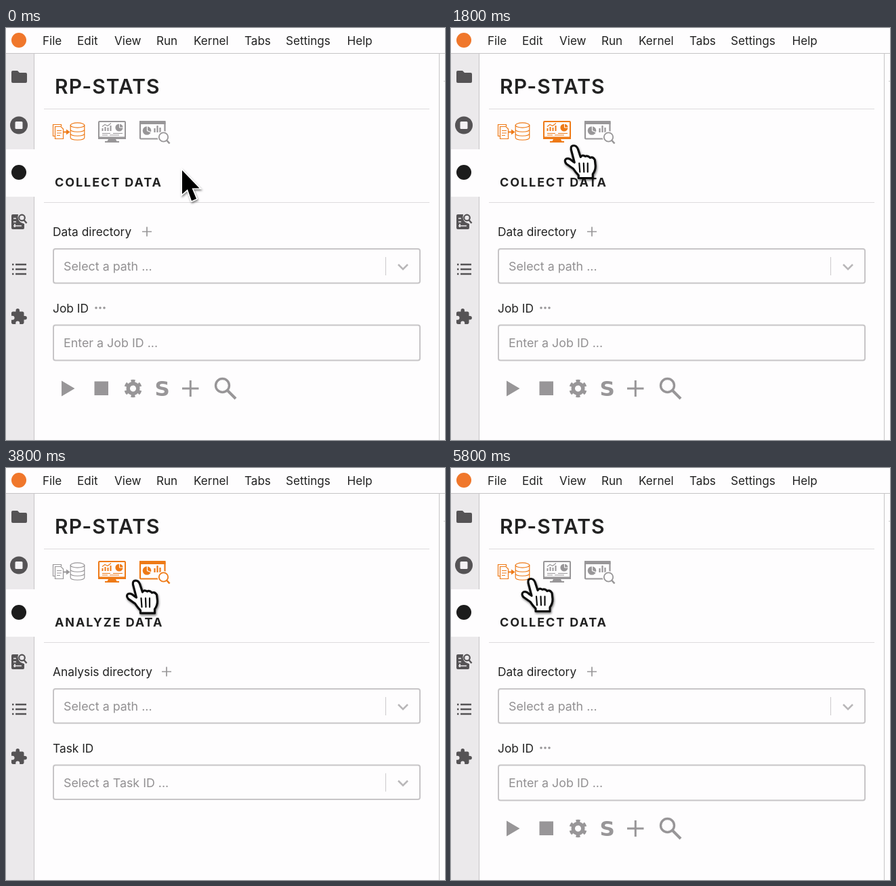
Recreate the animation shown at these times as an HTML page. Size 648 by 608 pixels, loop 5.9 s.

```html
<!DOCTYPE html>
<html lang="en">
<head>
<meta charset="utf-8">
<title>Tabs demo</title>
<style>
  html, body { margin: 0; height: 100%; overflow: hidden; background: #fefdfe; }
  svg { display: block; width: 100vw; height: 100vh; font: 17.1px Inter, "Open Sans", sans-serif; fill: #222; }
  .line { fill: none; stroke: currentColor; }
  .solid { fill: currentColor; }
  .gray { color: #989698; }
  .dark { color: #555355; }
  .label { font-size: 17.35px; }
  .hint { font-size: 17.85px; fill: #929092; }
  .box { fill: #fefdfe; stroke: #c7c5c7; stroke-width: 2; }
  .rule { stroke: #dddbdd; }
  .edge { stroke: #c6c4c6; }
  .head { font-size: 18px; font-weight: 700; letter-spacing: 1.9px; }
  .note { font: 31.3px Lato, Carlito, sans-serif; fill: #444; }
  .icon { color: #989698; }
  .icon.hot { color: #ee7a17; }
</style>
</head>
<body>
<svg viewBox="0 0 648 608">
  <defs>
    <filter id="shadow" x="-40%" y="-40%" width="180%" height="180%">
      <feDropShadow dx="1" dy="2" stdDeviation="1.8" flood-opacity=".5"/>
    </filter>
    <g id="dots" class="solid"><circle cx="-6" r="1.8"/><circle r="1.8"/><circle cx="6" r="1.8"/></g>
    <path id="plus" class="line" d="M-7 0H7M0-7V7" stroke-width="1.7"/>
    <g id="select">
      <rect class="box" x="70" y="0" width="541" height="50.5" rx="3"/>
      <path d="M560.5 12V39" stroke="#cccacc"/>
      <path d="M579 23l7 7 7-7" fill="none" stroke="#b9b7b9" stroke-width="2.5"/>
    </g>
  </defs>

  <!-- menu bar -->
  <circle cx="19" cy="18" r="11" fill="#f0772b"/>
  <g id="menu"></g>

  <!-- side bar -->
  <path d="M0 38H41V608H0z" fill="#ebe9eb"/>
  <path d="M0 179H42V249H0z" fill="#fefdfe"/>
  <path class="edge" d="M0 37.5H648M41.5 38V179M41.5 249V608M639.5 38V608" fill="none"/>
  <path d="M646 78h2v1h-2z" fill="#ccc"/>
  <g class="dark">
    <path class="solid" d="M10 63h7l3 3h9q2 0 2 2v11q0 2-2 2H10q-2 0-2-2V65q0-2 2-2z"/>
    <circle class="solid" cx="19" cy="143.5" r="13"/>
    <rect x="13.5" y="138" width="11" height="11" rx="1.5" fill="#f4f2f4"/>
    <circle cx="19" cy="213" r="11" fill="#1c1c1c"/>
    <path class="solid" d="M10 275h8q-2 8 4 12l5 2v6q0 2-2 2H10q-2 0-2-2V277q0-2 2-2z"/>
    <path d="M11 281h4M11 286h4M11 292h12M13 289v5" stroke="#ebe9eb" stroke-width="1.7"/>
    <circle class="line" cx="23.5" cy="280" r="4.3" stroke-width="2.2"/>
    <path class="line" d="M26.5 283.5l4 4.5" stroke-width="2.4"/>
    <path class="line" d="M14 349H30M14 356H30M14 363H30M9 349h2.5M9 356h2.5M9 363h2.5" stroke-width="2.3"/>
    <path class="solid" transform="translate(5.8 413) scale(1.09)" d="M20.5 11H19V7c0-1.1-.9-2-2-2h-4V3.500a2.500 2.500 0 0 0-5 0V5H4c-1.100 0-2 .9-2 2v3.800h1.500a2.700 2.700 0 0 1 0 5.400H2V20c0 1.100.9 2 2 2h3.800v-1.500a2.700 2.700 0 0 1 5.400 0V22H17c1.100 0 2-.9 2-2v-4h1.500a2.500 2.500 0 0 0 0-5z"/>
  </g>

  <!-- panel -->
  <text x="72" y="96.500" font-size="30" font-weight="600" letter-spacing="1.1">RP-STATS</text>
  <path class="rule" d="M56 119.5H625M56 257.5H625"/>

  <g class="icon">
    <g class="line" stroke-width="1.2">
      <path d="M72 159.5H69.500V142.500H81.500V145M72.500 145.500H81l3.500 3.500V163.500H72.500zM75 151.500h7M75 155h7M75 158.500h5"/>
      <path d="M85 153.500h5" stroke-width="2"/>
      <ellipse cx="105.500" cy="143.500" rx="10.300" ry="3.600"/>
      <path d="M95.200 143.500V161.500c0 5 20.600 5 20.600 0V143.500M95.200 149.500c0 5 20.600 5 20.600 0M95.200 155.500c0 5 20.600 5 20.600 0"/>
    </g>
    <path class="solid" d="M89 149.500l5.500 4-5.500 4z"/>
  </g>
  <g class="icon">
    <rect class="line" x="137" y="138" width="39" height="25" rx="1" stroke-width="2"/>
    <path class="solid" d="M136 160.500H177V164H136zM151 164H162L163.500 167H167V169H146V167H149.500z"/>
    <path class="line" d="M142.500 152v-4M146.500 152v-6M150.500 152v-5M154.500 152v-8" stroke-width="2"/>
    <path class="line" d="M142 145.500l4-3 4 2 5-4M142 155.500h12M158 155.500h14M142 158h8M153 158h14" stroke-width="1.100"/>
    <circle class="solid" cx="167" cy="147" r="5.600"/>
    <path d="M167.500 141V147H173" fill="none" stroke="#fefdfe"/>
  </g>
  <g class="icon">
    <rect class="line" x="198" y="138" width="36.500" height="25.500" rx="1" stroke-width="2.200"/>
    <path class="solid" d="M197 137H235.500V142H197z"/>
    <circle class="solid" cx="208" cy="151.500" r="6.300"/>
    <path d="M208.500 145V151.500L214 154" fill="none" stroke="#fefdfe" stroke-width="1.200"/>
    <path class="line" d="M219.500 154v-6M223.500 154v-10M227.500 154v-7" stroke-width="2.200"/>
    <circle cx="232.500" cy="161" r="9" fill="#fefdfe"/>
    <circle class="line" cx="232.500" cy="161" r="6.700" stroke-width="1.800"/>
    <path class="line" d="M237.500 166l4 4.500" stroke-width="2.600"/>
  </g>

  <text id="heading" class="head" x="72" y="233.500"></text>
  <text id="dirLabel" class="label" x="69" y="307"></text>
  <use id="add" class="gray" href="#plus" y="300.500"/>
  <use href="#select" y="326"/>
  <text class="hint" x="85" y="358">Select a path ...</text>
  <text id="idLabel" class="label" x="69" y="420"></text>
  <rect id="entry" class="box" x="70" y="438.500" width="541" height="52" rx="3"/>
  <use id="choice" href="#select" y="438.500"/>
  <text id="idHint" class="hint" x="85" y="471"></text>

  <g id="collect" class="gray">
    <use href="#dots" x="139" y="413"/>
    <path class="solid" d="M82 520.500V543.500L101.500 532zM130.500 521.500H151V542H130.500z"/>
    <g class="line" transform="translate(187.500 532) rotate(15)">
      <circle r="7.300" stroke-width="5.500"/>
      <circle r="11" stroke-width="4.400" pathLength="12" stroke-dasharray="1 1"/>
    </g>
    <text class="solid" x="219.500" y="543" style="font: bold 31px 'DejaVu Sans', sans-serif">S</text>
    <path class="line" d="M260 532H284.500M272.300 520V544" stroke-width="3"/>
    <circle class="line" cx="319.500" cy="527.500" r="10" stroke-width="3.400"/>
    <path class="line" d="M327 535l12 12" stroke-width="4"/>
  </g>
  <g id="visualize" class="gray">
    <path class="line" d="M148.500 404.900A8.300 8.300 0 1 0 152.500 409M146 401.500l3.500 3.300-3.500 3.300" stroke-width="1.500"/>
    <use href="#dots" x="174" y="413"/>
    <use href="#dots" x="201" y="413"/>
  </g>

  <g id="note">
    <path d="M286 150.500H316" stroke="#f05a28" stroke-width="4" stroke-linecap="round"/>
    <circle cx="286" cy="150.500" r="5" fill="#f05a28"/>
    <text class="note" x="327" y="162">Select an icon to</text>
    <text class="note" x="327" y="196">change the tab</text>
  </g>

  <g id="arrow" filter="url(#shadow)">
    <path d="M0 1V36L8 29 14 46 21 43 14.500 27.500H25.500z" fill="#000" stroke="#fff" stroke-width="3" paint-order="stroke"/>
  </g>
  <g id="hand" filter="url(#shadow)" stroke="#111" stroke-linejoin="round" stroke-linecap="round">
    <path d="M-4 6Q-5 0 0 0Q4 0 6 5L10 17Q12 13 17 16Q20 14 24 18Q28 16 31 21L32 30Q32 37 28 42V48H7V44Q3 40-1 34L-11 27Q-15 22-11 19.500Q-7 18-2 23L1 25z" fill="#fff" stroke-width="3.200"/>
    <path d="M8 26l1 13M14.500 26l.5 13M20.500 26v13" fill="none" stroke-width="2.200"/>
  </g>
</svg>
<script>
const $ = id => document.getElementById(id);
const LOOP = 5900;
const tabs = [
  { name: 'COLLECT DATA', dir: 'Data directory', id: 'Job ID', hint: 'Enter a Job ID ...', add: 208 },
  { name: 'VISUALIZE DATA', dir: 'Data directory', id: 'Job ID', hint: 'Select a Job ID ...', add: 208 },
  { name: 'ANALYZE DATA', dir: 'Analysis directory', id: 'Task ID', hint: 'Select a Task ID ...', add: 237 }
];
const clicks = [[0, 0], [2200, 1], [3300, 2], [4100, 1], [5400, 0]];

const easeOut = u => u * (2 - u);
const easeInOut = u => u < .5 ? 2 * u * u : 1 - 2 * (1 - u) ** 2;
const clamp = u => Math.max(0, Math.min(1, u));
// start, duration, destination, easing
const moves = [
  [1200, 750, 178, 172, easeOut],
  [2550, 450, 232, 168, easeInOut],
  [3600, 400, 178, 165.5, easeOut],
  [4600, 400, 118, 163.5, easeOut]
];

const items = { File: 54, Edit: 105, View: 160, Run: 222, Kernel: 277, Tabs: 352, Settings: 413, Help: 503.5 };
$('menu').innerHTML = Object.entries(items).map(([s, x]) => `<text x="${x}" y="25">${s}</text>`).join('');
const icons = document.querySelectorAll('.icon');
const show = (id, on) => $(id).style.display = on ? '' : 'none';

function pointer(t) {
  let x = 260, y = 209;
  for (const [start, span, toX, toY, ease] of moves) {
    const k = ease(clamp((t - start) / span));
    x += (toX - x) * k;
    y += (toY - y) * k;
  }
  return [x, y];
}

function draw(now) {
  const t = Math.floor(now % LOOP / 100) * 100;
  const [x, y] = pointer(t);
  const open = clicks.filter(c => c[0] <= t).pop()[1];
  const hover = y > 180 ? -1 : x < 136 ? 0 : x < 195 ? 1 : 2;
  const tab = tabs[open];

  icons.forEach((el, i) => el.classList.toggle('hot', i === open || i === hover));
  $('heading').textContent = tab.name;
  $('dirLabel').textContent = tab.dir;
  $('idLabel').textContent = tab.id;
  $('idHint').textContent = tab.hint;
  $('add').setAttribute('x', tab.add);
  show('collect', open === 0);
  show('entry', open === 0);
  show('choice', open > 0);
  show('visualize', open === 1);

  $('note').setAttribute('opacity', clamp(Math.min(t / 400, (1100 - t) / 400)));
  show('arrow', hover < 0);
  show('hand', hover >= 0);
  for (const id of ['arrow', 'hand']) $(id).setAttribute('transform', `translate(${x} ${y})`);
}

const began = performance.now();
function tick() {
  draw(performance.now() - began);
  requestAnimationFrame(tick);
}
tick();
</script>
</body>
</html>
```
